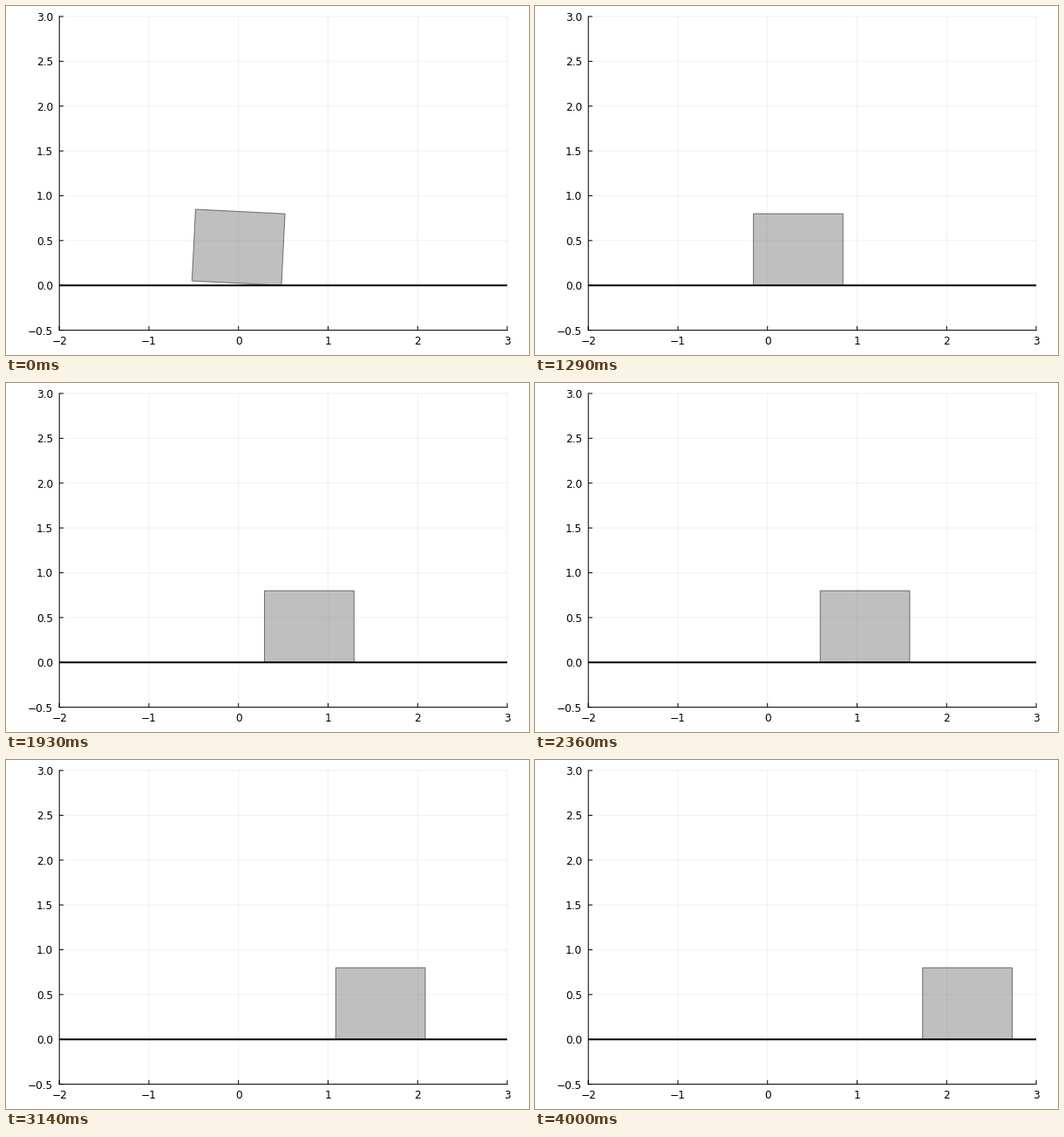
These frames come from a looping animation (600x400 px, 4070 ms). A matplotlib script:

```python
import numpy as np
import matplotlib.pyplot as plt
from matplotlib.animation import FuncAnimation
from matplotlib.patches import Polygon

W, H, DPI = 600, 400, 100
FRAMES, LOOP = 57, 4070
PX = 72 / DPI  # points per pixel

LEFT, RIGHT, TOP, BOTTOM = 61.2, 575.0, 12.0, 371.6
XMIN, XMAX, YMIN, YMAX = -2, 3, -0.5, 3
TICK = 4.7 * (XMAX - XMIN) / (RIGHT - LEFT)  # tick length in data units

BOX_W, BOX_H = 1.0, 0.8
TILT, FALL = 0.05, 3  # first lean in radians, fall time in frames
START, RAMP, SPEED = 8.5, 5.2, 0.0497  # sliding, in frames and units per frame

plt.rcParams["font.family"] = "DejaVu Sans"
fig = plt.figure(figsize=(W / DPI, H / DPI), dpi=DPI, facecolor="white")
ax = fig.add_axes([LEFT / W, 1 - BOTTOM / H,
                   (RIGHT - LEFT) / W, (BOTTOM - TOP) / H])
xticks, yticks = np.arange(XMIN, XMAX + 1), np.arange(YMIN, YMAX + 0.1, 0.5)
ax.set(xlim=(XMIN, XMAX), ylim=(YMIN, YMAX), xticks=xticks, yticks=yticks)
ax.set_axisbelow(True)
ax.grid(color="black", alpha=0.06, linewidth=PX, clip_on=False, snap=False)
ax.tick_params(length=0, width=0, labelsize=8.75)
ax.tick_params(axis="x", pad=4.5)
ax.tick_params(axis="y", pad=7.2 * PX)

# Axis lines and ticks keep their fractional pixel positions.
for side in ("top", "right"):
    ax.spines[side].set_visible(False)
for side in ("left", "bottom"):
    ax.spines[side].set(linewidth=PX, snap=False)
thin = dict(color="black", linewidth=PX, snap=False, clip_on=False)
ax.vlines(xticks, YMIN, YMIN + TICK, **thin)
ax.hlines(yticks, XMIN, XMIN + TICK, **thin)

box = Polygon(np.zeros((4, 2)), closed=True, facecolor=(0.5, 0.5, 0.5, 0.5),
              edgecolor=(0, 0, 0, 0.5), linewidth=PX, joinstyle="miter",
              snap=False, zorder=3)
ax.add_patch(box)
ax.plot([XMIN, XMAX], [0, 0], color="black", linewidth=2 * PX,
        solid_capstyle="butt", snap=False, zorder=4)


def tilt(k):
    """Clockwise lean: a quick fall with a soft landing."""
    return TILT * max(1 - k / FALL, 0) ** 2.1


def slide(k):
    """Steady acceleration from rest, then constant speed."""
    t = max(k - START, 0)
    if t < RAMP:
        return SPEED * t * t / (2 * RAMP)
    return SPEED * (t - RAMP / 2)


def corners(x, a):
    c, s = np.cos(a), np.sin(a)
    y = BOX_H / 2 * c + BOX_W / 2 * s  # lowest corner rests on the ground
    pts = np.array([(-1, -1), (1, -1), (1, 1), (-1, 1)]) * (BOX_W / 2, BOX_H / 2)
    return pts @ np.array([(c, -s), (s, c)]) + (x, y)


def draw(k):
    box.set_xy(corners(slide(k), tilt(k)))
    return (box,)


anim = FuncAnimation(fig, draw, frames=FRAMES, interval=LOOP / FRAMES,
                     init_func=lambda: draw(0), repeat=True, repeat_delay=0)
plt.show()
```
